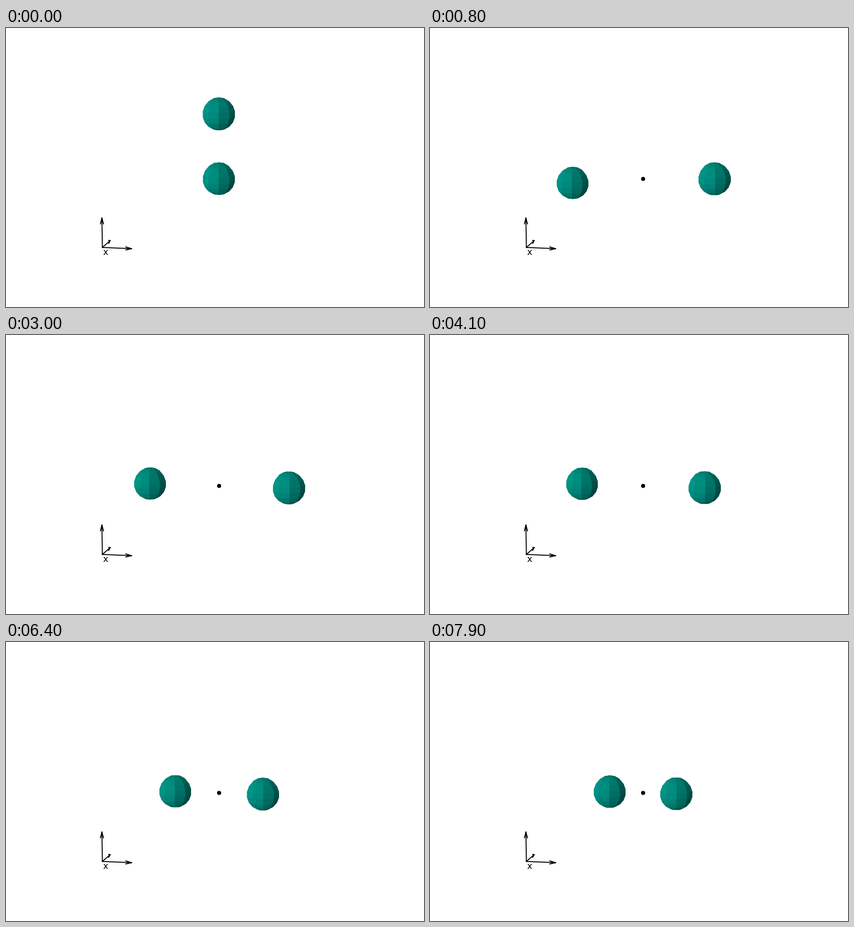
A matplotlib script that plays this animation: 917 by 611 pixels, repeating every 8 s.

```python
import numpy as np
import matplotlib.pyplot as plt
from matplotlib.animation import FuncAnimation
from matplotlib.collections import LineCollection, PolyCollection

W, H, DPI = 917, 611, 100
FRAMES, STEP = 80, 100

# Camera: turned 10 degrees, raised 10 degrees, mild perspective
TURN = TILT = np.radians(10)
DIST = 2750
VANISH = np.array([470.0, 308.0])
SHIFT = np.array([-3.0, -22.0])

RADIUS = 35.6
TEAL = np.array([0, 150, 136]) / 255
LIGHT = np.array([-2, -2, 1]) / 3


def project(p):
    """Screen position and nearness of world points, both in pixels."""
    x, y, z = np.moveaxis(np.asarray(p, float), -1, 0)
    right = x * np.cos(TURN) + y * np.sin(TURN)
    near = x * np.sin(TURN) - y * np.cos(TURN)
    up = z * np.cos(TILT) - near * np.sin(TILT)
    depth = near * np.cos(TILT) + z * np.sin(TILT)
    s = DIST / (DIST - depth)
    sx = VANISH[0] + (right + SHIFT[0]) * s
    sy = VANISH[1] - (up + SHIFT[1]) * s
    return np.stack([sx, sy], -1), depth


def on_sphere(u, v):
    return np.stack([np.cos(u) * np.sin(v), np.sin(u) * np.sin(v),
                     np.cos(v) + 0 * u], -1)


def make_sphere(n=9):
    """Facets of a unit sphere, back to front, with their shaded colours."""
    du, dv = 2 * np.pi / n, np.pi / n
    u, v = np.meshgrid(np.arange(n) * du, np.arange(n) * dv, indexing="ij")
    u, v = u.ravel(), v.ravel()
    corners = [(0, 0), (1, 0), (1, 1), (0, 1)]
    quads = np.stack([on_sphere(u + a * du, v + b * dv) for a, b in corners], 1)
    normals = on_sphere(u + du / 2, v + dv / 2)
    shade = 0.3 + 0.7 * (normals @ LIGHT + 1) / 2
    order = np.argsort(project(normals)[1])
    return quads[order], shade[order, None] * TEAL


# Slow drift inward of half the gap: time in s, distance in px
DRIFT = np.polyfit(
    [0.8, 1.6, 1.8, 2.7, 3.0, 3.6, 4.5, 5.2, 6.4, 7.2, 7.9],
    [178.6, 171.5, 169.3, 156.5, 151.8, 142.5, 128, 115.9, 95.7, 83.5, 72.9], 4)


def wave(t, peak, period, decay):
    return np.exp(-t / decay) * np.cos(2 * np.pi * (t - peak) / period)


def positions(t):
    spread = 1 - np.exp(-(t / 0.4975) ** 1.5)
    x = np.polyval(DRIFT, t) * spread / np.cos(TURN)
    mean = 71.5 * wave(t, 0, 1.6, 0.3)
    swing = 71.5 * wave(t, 0.66, 0.8, 0.4) / wave(0, 0.66, 0.8, 0.4)
    return np.array([[x, 0, mean + swing], [-x, 0, mean - swing]])


def arrow(base, direction, side, length=67.5, head=0.2):
    """Shaft and two barbs opened 15 degrees towards +side and -side."""
    d, s = np.array(direction, float), np.array(side, float)
    tip = base + length * d
    a = np.radians(15)
    barbs = [tip - head * length * (np.cos(a) * d + k * np.sin(a) * s)
             for k in (1, -1)]
    return [project([base, tip])[0]] + [project([tip, b])[0] for b in barbs]


fig = plt.figure(figsize=(W / DPI, H / DPI), dpi=DPI, facecolor="white")
ax = fig.add_axes([0, 0, 1, 1])
ax.set_xlim(0, W)
ax.set_ylim(H, 0)
ax.axis("off")

X, Y, Z = np.eye(3)
corner = np.array([-266.6, 0, -165.8])
lines = arrow(corner, X, Z) + arrow(corner, Y, Z) + arrow(corner, Z, X)
ax.add_collection(LineCollection(lines, colors="black", linewidths=1.5,
                                 capstyle="projecting"))
ax.text(212.2, 497, "x", fontsize=14, family="DejaVu Sans", va="baseline")

dot = project([0, 0, 0])[0]
ax.plot(*dot, "o", color="black", ms=6, mew=0.5, zorder=2)

quads, colors = make_sphere()
balls = [PolyCollection([], facecolors=colors, edgecolors="face",
                        linewidths=0.3, zorder=3) for _ in range(2)]
for ball in balls:
    ax.add_collection(ball, autolim=False)


def draw(i):
    for ball, pos in zip(balls, positions(i * STEP / 1000)):
        ball.set_verts(project(pos + RADIUS * quads)[0])
        ball.set_zorder(3 + project(pos)[1] / 1000)
    return balls


anim = FuncAnimation(fig, draw, frames=FRAMES, interval=STEP,
                     repeat=True, repeat_delay=0, blit=False)
plt.show()
```
